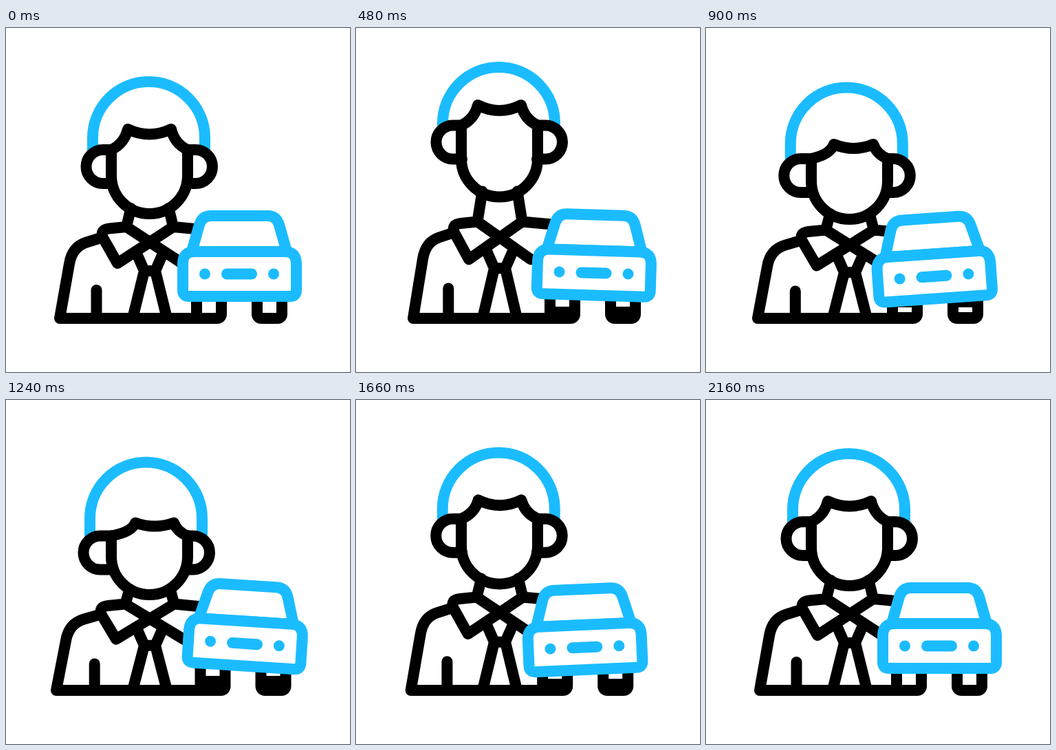
Write an HTML page that moves like this. It is 500 by 500 pixels and loops after 2400 ms.

```html
<!DOCTYPE html>
<html lang="en">
<head>
<meta charset="utf-8">
<title>Driver and car</title>
<style>
  html, body { margin: 0; width: 100%; height: 100%; overflow: hidden; background: #fff; }
  svg { display: block; width: 100vw; height: 100vh; }
  .line { fill: none; stroke: #000; stroke-width: 16; stroke-linecap: round; stroke-linejoin: round; }
  .blue { stroke: #1bbcff; }
  .flat { stroke-linecap: butt; }
  .solid { fill: #fff; }
</style>
</head>
<body>
<svg viewBox="0 0 500 500">
  <g class="line">
    <path id="torso"/>
    <path id="collar"/>
    <path id="tie"/>
  </g>
  <path id="hair" class="line blue flat"/>
  <g class="line">
    <path id="ears"/>
    <path id="face"/>
    <path id="fringe"/>
  </g>
  <path id="wheels"/>
  <path id="gaps" fill="#fff"/>
  <g id="car" class="line blue">
    <path class="solid" d="M270 325 L281 286 Q285 273 298 273 H380 Q393 273 397 286 L408 325Z"/>
    <path class="solid" d="M274 325 H405 Q422 325 422 343 V381 Q422 390 413 390 H266 Q257 390 257 381 V343 Q257 325 274 325Z"/>
    <path d="M289 357.5h.01M321 357.5H357M389 357.5h.01"/>
  </g>
</svg>
<script>
const LOOP = 2400, STEP = 20, MID = 418;
const times = [160, 480, 700, 900, 1120, 1240, 1500, 1840, 2160];
const tracks = {
  hair:   [0, -21, 1, 8.5, 11.5, 12.5, -12, 11, 0],
  ear:    [0, -35.5, 3, 13, 19, 20.5, -22.5, 17.5, 0],
  tip:    [0, -35, 6, 22, 30, 31.5, -21, 21.5, 0],
  brow:   [0, -34.5, 6, 20.5, 28, 29, -20.5, 21.5, 0],
  chin:   [0, -24.5, 1, 8, 12, 13, -14, 11, 0],
  lift:   [0, 1, -.45, -.6, -1, -1, .95, -.4, 0],
  turn:   [0, 0, .4, .8, 1, 1, .2, 0, 0],
  carX:   [0, 6.5, -1, -7.5, 12, 8, -11.5, -.5, 0],
  carY:   [0, -1.5, 1, 3.5, -4, -3.5, 2, 2, 0],
  tilt:   [0, 1.7, -1, -4, 4.5, 3.7, -4, -.5, 0],
  wheelX: [0, 5, -1, -6, 9, 5.5, -10, -.5, 0],
  gapTop: [388, 388, 396, 406, 388, 388, 388, 388, 388],
  gapEnd: [414, 405, 410, 413, 402, 401, 399, 413, 414]
};

// Smooth curve through the keys without overshoot
function slope(v, i) {
  if (i === 0 || i === v.length - 1) return 0;
  const a = (v[i] - v[i - 1]) / (times[i] - times[i - 1]);
  const b = (v[i + 1] - v[i]) / (times[i + 1] - times[i]);
  return a * b <= 0 ? 0 : 2 * a * b / (a + b);
}

function sample(v, t) {
  const last = times.length - 1;
  if (t <= times[0]) return v[0];
  if (t >= times[last]) return v[last];
  const i = times.findIndex(k => k > t) - 1;
  const h = times[i + 1] - times[i], s = (t - times[i]) / h, r = 1 - s;
  return v[i] * (1 + 2 * s) * r * r + slope(v, i) * h * s * r * r
       + v[i + 1] * s * s * (3 - 2 * s) - slope(v, i + 1) * h * s * s * r;
}

const byId = id => document.getElementById(id);
const setPath = (id, d) => byId(id).setAttribute('d', d);

function drawBody(p) {
  const { lift } = p;
  const jx = 175 + 1.5 * lift, jy = 289 - 7.5 * lift;
  const tx = 162 + 2 * lift, ty = 342 - 5.7 * lift;
  const nx = 181.5 + 2 * lift, ny = 262 + p.chin;
  const sx = 5 * lift, sy = -7 * lift;
  const cx = 2 * lift;
  const knot = 353 - 3.8 * lift;

  setPath('torso',
    `M292 422 H${78 + sx} L${92 + sx} ${343 + sy} Q${96 + sx} ${318 + sy} ${117 + 3.5 * lift} ${311.5 + sy}
     L${138 + cx} ${305 + sy} M${131.5 + 2.8 * lift} 422 V${381 - 2.5 * lift}`);
  setPath('collar',
    `M${nx} ${ny} L${jx} ${jy} L${150 + cx} ${jy + 2.5} Q${136 + cx} ${jy + 4} ${141 + cx} ${jy + 16}
     L${tx} ${ty} L${MID - jx} ${jy} L${MID - nx} ${ny}
     M${jx} ${jy} L${MID - tx} ${ty} M${MID - jx} ${jy} L285 ${jy + 4}`);
  setPath('tie',
    `M190 ${knot - 25} L201 ${knot} H217 L228 ${knot - 25} M201 ${knot} L184 422 M217 ${knot} L234 422`);
}

function drawHead(p) {
  const dx = -4 * p.turn;
  const top = 177 + p.ear, arc = 159.5 + p.hair, jaw = 214.5 + p.chin;
  const lx = 177 + 11 * p.turn, rx = 240 + 4 * p.turn, tip = 147 + p.tip;
  const bend = tip + .7 * (top - tip);

  setPath('hair',
    `M${126 + dx} ${top + 1} V${arc} a81.5 81.5 0 0 1 163 0 V${top + 1}`);
  setPath('ears',
    `M153 ${top} H${141 + dx} a24.5 24.5 0 0 0 0 49 H154
     M264 ${top} H${275.5 + dx} a24.5 24.5 0 0 1 0 49 H263`);
  setPath('face', `M153 ${top} V${jaw} a55.5 55.5 0 0 0 111 0 V${top}`);
  setPath('fringe',
    `M153 ${top} Q${lx - 5} ${bend} ${lx} ${tip}
     Q${(lx + rx) / 2} ${2 * (154.5 + p.brow) - tip} ${rx} ${tip}
     Q${rx + 5} ${bend} 264 ${top}`);
}

function drawCar(p) {
  const sides = [269 + p.wheelX, 357 + p.wheelX];
  setPath('wheels', sides.map(x =>
    `M${x} 380 H${x + 52} V416 a14 14 0 0 1 -14 14 H${x + 14} a14 14 0 0 1 -14 -14Z`).join(''));
  setPath('gaps', sides.map(x =>
    `M${x + 16} ${p.gapTop} h20 V${p.gapEnd} h-20Z`).join(''));
  byId('car').setAttribute('transform',
    `translate(${p.carX} ${p.carY}) rotate(${p.tilt} 338.5 357.5)`);
}

function draw(t) {
  const p = {};
  for (const name in tracks) p[name] = sample(tracks[name], t);
  drawBody(p);
  drawHead(p);
  drawCar(p);
}

const start = performance.now();
function tick() {
  const t = (performance.now() - start) % LOOP;
  draw(Math.floor(t / STEP) * STEP);
  requestAnimationFrame(tick);
}
tick();
</script>
</body>
</html>
```
